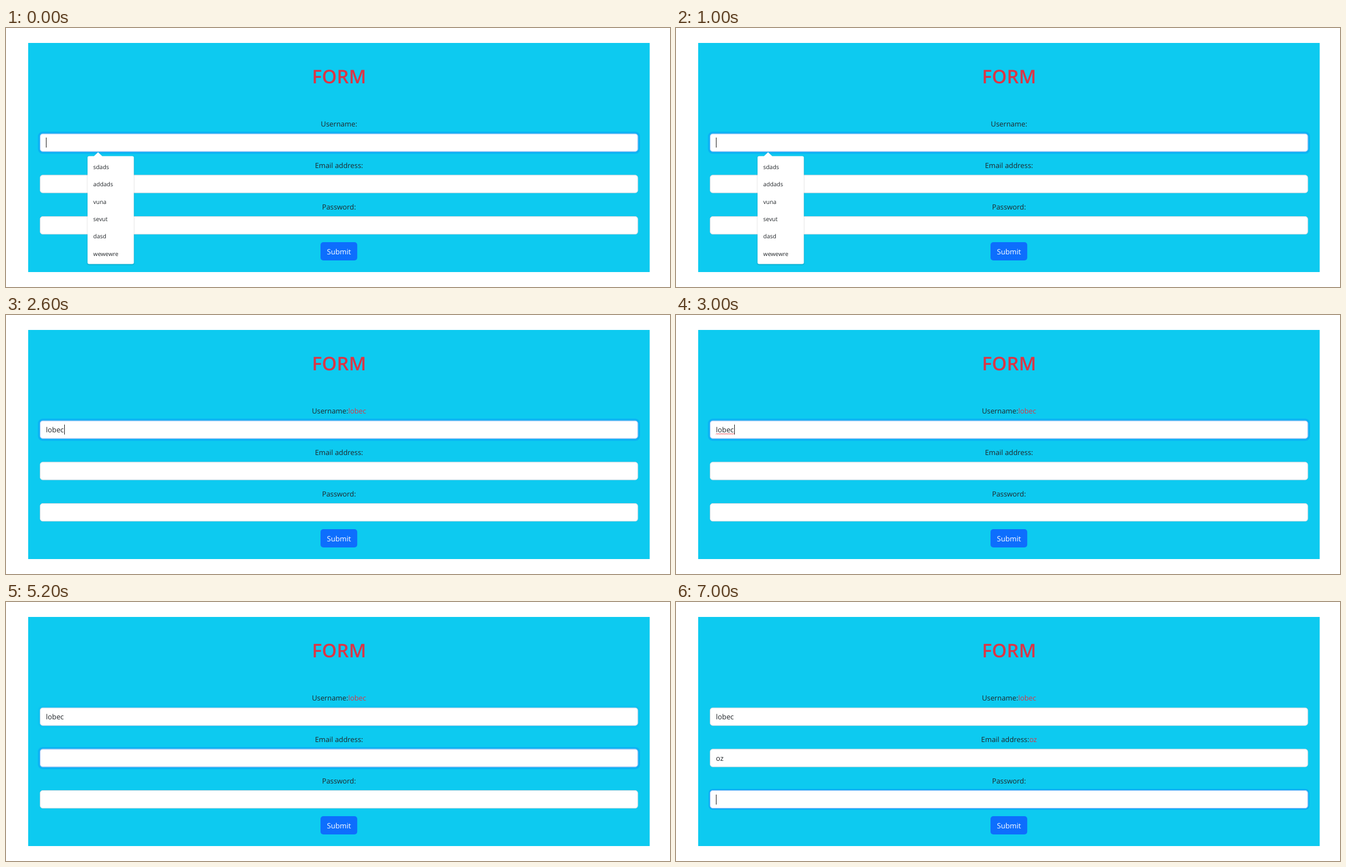
Animation, 1197 px wide and 468 px high, one loop 8 s. Source, as an HTML page:

```html
<!DOCTYPE html>
<html lang="en">
<head>
<meta charset="utf-8">
<title>Form</title>
<style>
  html, body { margin: 0; width: 100%; height: 100%; overflow: hidden; background: #fff; }
  svg { display: block; width: 1197px; height: 468px; }
  text {
    font-family: "Open Sans", "Noto Sans", sans-serif;
    font-size: 12.85px;
    fill: #212529;
    text-rendering: geometricPrecision;
  }
  .mid { text-anchor: middle; }
  .title { font-size: 34px; font-weight: 600; fill: #dc3545; }
  .red { fill: #dc3545; }
  .button { font-size: 13.1px; fill: #fff; }
  .menu text { font-size: 10.4px; }
  .menu .box { fill: #fff; filter: drop-shadow(0 1px 1px rgba(0, 0, 0, .22)); }
  .caret { fill: #1c1c1c; }
  .wave { fill: none; stroke: #e8303a; stroke-width: 1; }

  .menu, .blank1, .typed1, .caret1, .wave, .blank2, .typed2,
  .focus1, .fade1, .focus2, .focus3 { animation: 8s step-end infinite; }

  .menu, .blank1 { animation-name: to2; }
  .typed1 { animation-name: from2; }
  .caret1 { animation-name: from2to4; }
  .wave   { animation-name: from3to4; }
  .focus1 { animation-name: to4; }
  .fade1  { animation-name: from4to6; }
  .focus2 { animation-name: from4to7; }
  .blank2 { animation-name: to6; }
  .typed2 { animation-name: from6; }
  .focus3 { animation-name: from7; }

  @keyframes to2 { 0% { opacity: 1 } 25%, 100% { opacity: 0 } }
  @keyframes to4 { 0% { opacity: 1 } 50%, 100% { opacity: 0 } }
  @keyframes to6 { 0% { opacity: 1 } 75%, 100% { opacity: 0 } }
  @keyframes from2 { 0% { opacity: 0 } 25%, 100% { opacity: 1 } }
  @keyframes from6 { 0% { opacity: 0 } 75%, 100% { opacity: 1 } }
  @keyframes from7 { 0% { opacity: 0 } 87.5%, 100% { opacity: 1 } }
  @keyframes from2to4 { 0%, 50%, 100% { opacity: 0 } 25% { opacity: 1 } }
  @keyframes from3to4 { 0%, 50%, 100% { opacity: 0 } 37.5% { opacity: 1 } }
  @keyframes from4to6 { 0%, 75%, 100% { opacity: 0 } 50% { opacity: .25 } }
  @keyframes from4to7 { 0%, 87.5%, 100% { opacity: 0 } 50% { opacity: 1 } }
</style>
</head>
<body>
<svg viewBox="0 0 1197 468">
  <defs>
    <rect id="field" x="61.43" y="191.13" width="1077.6" height="32.1" rx="4.8"
          fill="#fff" stroke="#ced4da" stroke-width=".87"/>
    <g id="focus" fill="none">
      <rect x="59.25" y="188.95" width="1082" height="36.5" rx="7"
            stroke="#0d6efd" stroke-opacity=".25" stroke-width="3.5"/>
      <rect x="61.43" y="191.13" width="1077.6" height="32.1" rx="4.8"
            stroke="#86b7fe" stroke-width=".87"/>
    </g>
    <rect id="caret" class="caret" x="72" y="198" width="1" height="18"/>
  </defs>

  <rect x="40" y="27" width="1120.4" height="414" fill="#0dcaf0"/>
  <text class="mid title" x="600.5" y="100">FORM</text>

  <text class="mid blank1" x="600.3" y="178">Username:</text>
  <text class="mid typed1" x="600.3" y="178">Username:<tspan class="red">lobec</tspan></text>
  <text class="mid blank2" x="600.3" y="253">Email address:</text>
  <text class="mid typed2" x="600.3" y="253">Email address:<tspan class="red">oz</tspan></text>
  <text class="mid" x="600.3" y="328">Password:</text>

  <use href="#field"/>
  <use href="#field" y="74.7"/>
  <use href="#field" y="149.4"/>
  <use class="focus1" href="#focus"/>
  <use class="fade1" href="#focus"/>
  <use class="focus2" href="#focus" y="74.7"/>
  <g class="focus3">
    <rect x="59.9" y="338.9" width="1080.7" height="35.3" rx="6" fill="none"
          stroke="#0d6efd" stroke-opacity=".3" stroke-width="2.4"/>
    <rect x="61.43" y="340.53" width="1077.6" height="32.1" rx="4.8" fill="none"
          stroke="#86b7fe" stroke-width=".87"/>
    <use href="#caret" y="150"/>
  </g>

  <text class="typed1" x="72" y="212">lobec</text>
  <use class="caret1" href="#caret" x="33"/>
  <path class="wave" d="M72 215.5l1.5 -1.5 1.5 1.5 1.5 -1.5 1.5 1.5 1.5 -1.5 1.5 1.5 1.5 -1.5 1.5 1.5 1.5 -1.5 1.5 1.5 1.5 -1.5 1.5 1.5 1.5 -1.5 1.5 1.5 1.5 -1.5 1.5 1.5 1.5 -1.5 1.5 1.5 1.5 -1.5 1.5 1.5 1.5 -1.5 1.5 1.5"/>
  <text class="typed2" x="72" y="287">oz</text>

  <rect x="567" y="387" width="66.2" height="33" rx="5" fill="#0d6efd"/>
  <text class="mid button" x="600.2" y="409">Submit</text>

  <g class="menu">
    <use href="#caret"/>
    <path class="box" d="M150 231.5H158.5L166 224.5L173.5 231.5H227.5a3 3 0 0 1 3 3V423.5a3 3 0 0 1 -3 3H150a3 3 0 0 1 -3 -3V234.5a3 3 0 0 1 3 -3z"/>
    <text x="157.3" y="255">sdads</text>
    <text x="157.3" y="286.3">addads</text>
    <text x="157.3" y="317.6">vuna</text>
    <text x="157.3" y="348.9">sevut</text>
    <text x="157.3" y="380.2">dasd</text>
    <text x="157.3" y="411.5">wewewre</text>
  </g>
</svg>
</body>
</html>
```
